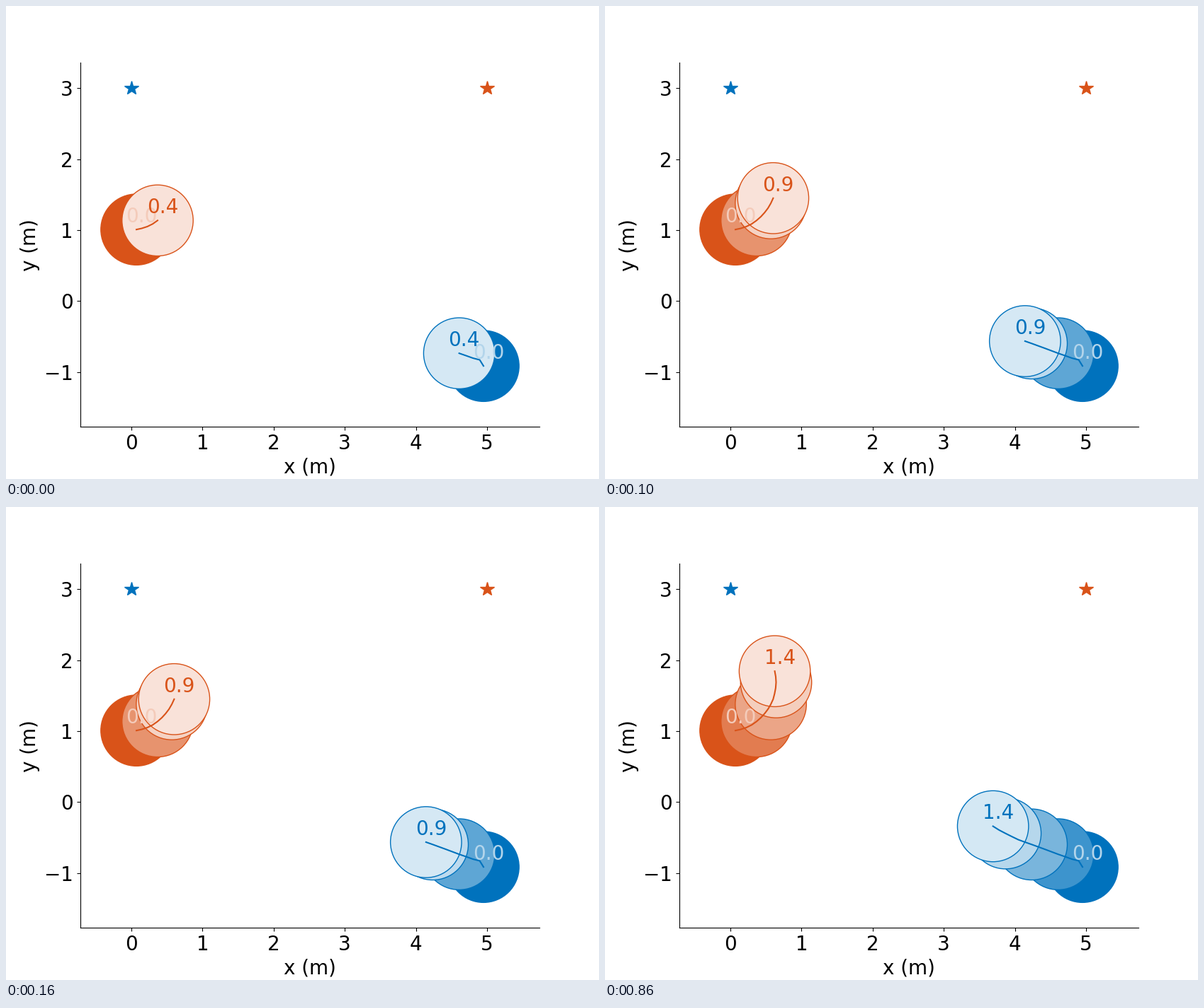
A matplotlib script that plays this animation: 837 px wide and 669 px high, repeating every 1300 ms.

```python
import matplotlib.pyplot as plt
import numpy as np
from matplotlib.animation import FuncAnimation
from matplotlib.colors import to_rgb
from matplotlib.patches import Circle

W, H, DPI = 837, 669, 100
EPS = 1e-4        # keeps the pixel size from rounding down
DT = 0.1          # seconds between path points
STRIDE = 4        # path points between drawn discs
RADIUS = 0.5
LAST_STEP = [4, 9, 14]
ORANGE, BLUE = "#D95319", "#0072BD"

PATHS = {
    ORANGE: np.array([
        (.071, 1.009), (.145, 1.025), (.225, 1.051), (.300, 1.088),
        (.369, 1.137), (.429, 1.190), (.481, 1.247), (.529, 1.310),
        (.569, 1.379), (.602, 1.451), (.622, 1.529), (.637, 1.608),
        (.643, 1.688), (.638, 1.768), (.624, 1.845)]),
    BLUE: np.array([
        (4.950, -.913), (4.897, -.827), (4.801, -.802), (4.706, -.768),
        (4.608, -.734), (4.515, -.699), (4.422, -.664), (4.329, -.630),
        (4.236, -.596), (4.142, -.563), (4.049, -.529), (3.958, -.485),
        (3.868, -.440), (3.778, -.393), (3.692, -.339)]),
}
GOALS = {BLUE: (0, 3), ORANGE: (5, 3)}

plt.rcParams.update({"font.family": "DejaVu Sans", "font.size": 20})
fig = plt.figure(figsize=((W + EPS) / DPI, (H + EPS) / DPI), dpi=DPI,
                 facecolor="white")
ax = fig.add_axes([0.125, 0.11, 0.775, 0.77])
ax.set(xlim=(-0.72, 5.74), ylim=(-1.772, 3.358), xlabel="x (m)",
       ylabel="y (m)", xticks=range(6), yticks=range(-1, 4))
ax.spines[["top", "right"]].set_visible(False)
for color, goal in GOALS.items():
    ax.plot(*goal, "*", color=color, ms=15)

moving = []


def tint(color, strength):
    """Blend a colour with white; strength 1 keeps it pure."""
    return tuple(1 - strength * (1 - c) for c in to_rgb(color))


def label(pos, step, color):
    moving.append(ax.text(pos[0] - 0.15, pos[1] + 0.1, f"{step * DT:.1f}",
                          color=color, zorder=5))


def draw_agent(color, path, last):
    for step in [*range(0, last, STRIDE), last]:
        fill = tint(color, 1 - step / (1.2 * last))
        disc = Circle(path[step], RADIUS, fc=fill, ec=color, lw=1, zorder=2)
        moving.append(ax.add_patch(disc))
    moving.extend(ax.plot(*path[:last + 1].T, color=color, lw=1.5, zorder=4))
    label(path[0], 0, tint(color, 0.3))
    label(path[last], last, color)


def update(frame):
    while moving:
        moving.pop().remove()
    last = LAST_STEP[min(frame, len(LAST_STEP) - 1)]
    for color, path in PATHS.items():
        draw_agent(color, path, last)
    return moving


anim = FuncAnimation(fig, update, frames=13, interval=100,
                     init_func=lambda: update(0), repeat=True, repeat_delay=0)
plt.show()
```
